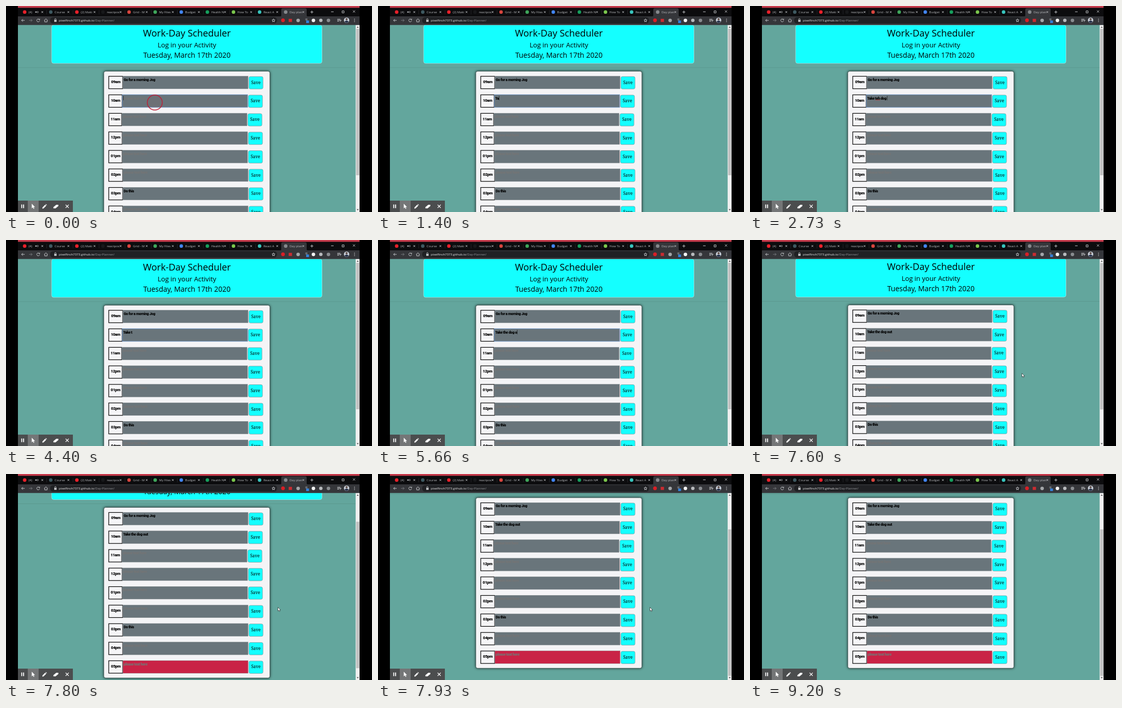
Animation, 706 px wide and 398 px high, one loop 9.26 s. Source, as an HTML page:

```html
<!DOCTYPE html>
<html lang="en">
<head>
<meta charset="utf-8">
<title>Work-Day Scheduler</title>
<style>
  html, body { margin: 0; width: 100%; height: 100%; overflow: hidden; background: #000; }
  svg { display: block; width: 706px; height: 398px; }
  text { white-space: pre; font-family: "Open Sans", "Noto Sans", sans-serif; }
  .mid { text-anchor: middle; }
  .tab { font-size: 6px; fill: #b9bbbe; }
  .heavy { font: 900 7.2px Roboto, sans-serif; letter-spacing: -.4px; }
  .hour { font-size: 7.7px; }
  .hint { fill: #757575; }
  .save { font: 8.2px "Noto Serif", serif; }
  .line { fill: none; stroke: #c4c6c9; stroke-width: 1; }
</style>
</head>
<body>
<svg viewBox="0 0 706 398">
  <defs>
    <clipPath id="viewport"><rect x="23" y="36.5" width="652" height="362"/></clipPath>
  </defs>
  <rect x="23" width="659" height="398" fill="#63a69d"/>
  <g clip-path="url(#viewport)"><g id="page"></g></g>
  <g id="scrollbar">
    <rect x="674.5" y="36.5" width="7.5" height="362" fill="#f1f1f1"/>
    <rect id="thumb" x="675.5" y="44" width="6" height="283" fill="#c1c1c1"/>
    <path d="M676.5 42l2-2.4 2 2.4zM676.5 392.5l2 2.4 2-2.4z" fill="#505050"/>
  </g>
  <g id="chrome"></g>
  <g id="recorder">
    <rect x="23" y="376" width="106" height="22" fill="#4b4d4e"/>
    <rect x="42" y="376" width="21" height="22" fill="#747677"/>
    <g fill="#fff">
      <path d="M29.5 383.5h1.8v7h-1.8zM33 383.5h1.8v7H33z"/>
      <path d="M49.7 382v9l2.1-1.9 1.4 3 1.4-.7-1.4-2.9h2.8z"/>
      <path d="M70 391.5l.5-2.5 5-5 2 2-5 5zM76.2 383.3l.8-.8 2 2-.8.8z"/>
      <path d="M91.5 388.5l5.5-4.5h4v2.5l-5.5 4.5h-4z"/>
    </g>
    <path d="M115 384l6 6m0-6l-6 6" stroke="#fff" stroke-width="1.1"/>
  </g>
  <circle id="ring" cx="287" cy="186.5" r="14.5" fill="#c0203a" fill-opacity=".06" stroke="#bd2038" stroke-width="1.5"/>
  <path id="pointer" d="M0 0v7.2l1.7-1.5 1.1 2.5 1.3-.6-1.1-2.4h2.2z" fill="#fff" stroke="#111" stroke-width=".6"/>
</svg>
<script>
const $ = id => document.getElementById(id);
const LOOP = 9260, SCROLL = 80.2, ROW_PITCH = 35.8, FIELD_WIDTH = 241.5;

const rect = (x, y, w, h, fill, more = "") =>
  `<rect x="${x}" y="${y}" width="${w}" height="${h}" fill="${fill}" ${more}/>`;
const dot = (x, y, r, fill) => `<circle cx="${x}" cy="${y}" r="${r}" fill="${fill}"/>`;
const text = (x, y, str, cls, more = "") => `<text x="${x}" y="${y}" class="${cls}" ${more}>${str}</text>`;
const line = (d, more = "") => `<path d="${d}" class="line" ${more}/>`;

// Planner page
const rows = [
  ["09am", 27.5, "Go for a morning Jog"], ["10am", 26.5], ["11am", 25.5],
  ["12pm", 26.5], ["01pm", 26.5], ["02pm", 27.5],
  ["03pm", 27.5, "Do this"], ["04pm", 27.5], ["05pm", 27.5]
];

function plannerRow([hour, width, note], i) {
  const y = 135.5 + i * ROW_PITCH, field = 198 + width, button = field + FIELD_WIDTH + 1.5;
  const editable = hour === "10am";
  const content = note
    ? text(field + 1.5, y + 9.2, note, "heavy")
    : text(field + 1.5, y + 9.2, "please text here", "heavy hint", editable ? 'id="hint"' : "");
  return rect(198.2, y + .3, width - .6, 24, "#f5f5f7", 'stroke="#000" stroke-width="1.2"') +
    text(198 + width / 2, y + 13.4, hour, "heavy hour mid") +
    rect(field, y, FIELD_WIDTH, 24.5, i === 8 ? "#c92346" : "#69757b", 'stroke="#8b9396" stroke-width=".5"') +
    content +
    (editable ? editor(field, y) : "") +
    rect(button, y + .8, 27.3, 24, "#14ffff", 'rx="3" stroke="#7e9c9f" stroke-width=".8"') +
    text(button + 13.5, y + 15, "Save", "save mid");
}

function editor(x, y) {
  return rect(x, y, FIELD_WIDTH, 24.5, "none", 'id="focus" stroke="#6590c4" stroke-width=".9"') +
    text(x + 1.5, y + 9.2, "", "heavy", 'id="entry"') +
    `<path id="squiggle" d="M242 ${y + 10.6}l1 -.8l1 .8l1 -.8l1 .8l1 -.8l1 .8l1 -.8l1 .8l1 -.8" fill="none" stroke="#d22" stroke-width=".6"/>` +
    rect(x + 1.6, y + 2.4, .6, 8.4, "#000", 'id="caret"');
}

$("page").innerHTML =
  rect(88, 36.8, 521.5, 74, "#14ffff", 'rx="4" stroke="#a5e3e0" stroke-width=".8"') +
  text(349, 59, "Work-Day Scheduler", "mid", 'font-size="17.9"') +
  text(349, 79.5, "Log in your Activity", "mid", 'font-size="12.9"') +
  text(349, 100, "Tuesday, March 17th 2020", "mid", 'font-size="13.87"') +
  rect(23, 118.6, 652, .7, "#589389") +
  rect(188.7, 126, 320.3, 329.5, "#f4f4f6",
    'rx="3.5" stroke="#2b4643" stroke-width=".8" style="filter:drop-shadow(0 0 2.5px #000b)"') +
  rows.map(plannerRow).join("");

// Browser frame
const tabs = [
  ["(4)", "#e8202a"], ["Course", "#3e5961"], ["(2) Maki", "#e8202a"], ["reactpos", "#17181a"],
  ["Grid - M", "#d8453e"], ["My Files", "#3fa75b"], ["Budget", "#4285f4"], ["Health N", "#16a05d"],
  ["How To", "#7bc74d"], ["React A", "#38c5bd"], ["Day plan", "#85888c"]
];
const cross = (x, y, r) => line(`M${x - r} ${y - r}l${2 * r} ${2 * r}m0 ${-2 * r}l${-2 * r} ${2 * r}`);

function browserTab([title, color], i) {
  const x = 36 + i * 50.35;
  const active = i === tabs.length - 1;
  return (active ? "" : rect(x + 42.5, 8, .5, 8, "#3a3b3e")) +
    dot(x, 11.7, 3.4, color) +
    text(x + 7.5, 13.8, title, "tab") +
    cross(x + 34, 11.7, 1.6);
}

$("chrome").innerHTML =
  rect(23, 0, 659, 21, "#0c0c0e") +
  rect(23, 0, 659, 3.5, "#c53a4b") +
  rect(23, 20, 659, 16.7, "#35363a") +
  `<path d="M528 20.5q3 0 3-3v-10q0-3 3-3h43q3 0 3 3v10q0 3 3 3z" fill="#35363a"/>` +
  tabs.map(browserTab).join("") +
  line("M59 10.3v2.8M61.2 9.8q1.4 1.9 0 3.8", 'stroke-width=".8"') +
  rect(56.5, 10.6, 2, 2.2, "#c4c6c9") +
  line("M587.2 11.7h5.6M590 8.9v5.6M627 11.2h5M648.3 9.5h3.8v3.8h-3.8z") + cross(671.3, 10.6, 2) +
  line("M36 27.8h-6m2.5-2.5l-2.5 2.5 2.5 2.5") +
  line("M44.5 27.8h6m-2.5-2.5l2.5 2.5-2.5 2.5", 'style="stroke:#777a7e"') +
  line("M64.3 26a2.8 2.8 0 1 0 .6 2.4M65 24.6v2h-2") +
  line("M73.5 28l3.5-3.3 3.5 3.3M74.7 27.3v3.5h4.6v-3.5") +
  rect(85, 21.5, 438, 12.6, "#202124", 'rx="6.3"') +
  rect(93, 27, 4.6, 3.6, "#c4c6c9") + line("M94 27v-1.4a1.3 1.3 0 0 1 2.6 0V27", 'stroke-width=".7"') +
  text(102, 30, '<tspan fill="#eee">pixelfinch7373.github.io</tspan><tspan fill="#94979b">/Day-Planner/</tspan>', "", 'font-size="6.1"') +
  line("M516 24.8l.9 2 2.1.2-1.6 1.5.5 2.1-1.9-1.1-1.9 1.1.5-2.1-1.6-1.5 2.1-.2z", 'stroke-width=".7"') +
  dot(534.3, 27.6, 3.6, "#d81f26") +
  rect(545.3, 24.8, 6.4, 6, "#c92c31") +
  dot(563.5, 27.8, 3.4, "#a3a6a9") +
  rect(577.5, 24, 4, 4, "#666a70") + rect(579, 28, 5.5, 5, "#347fd6") +
  dot(593, 27.8, 3.4, "#f2f2f2") +
  dot(607.3, 27.8, 3.3, "#b8babd") +
  dot(622, 27.8, 3.4, "#898c90") +
  line("M639 25.5h6m-6 2h6m-6 2h3.5m2.5 1v-3h2") +
  dot(657, 27.5, 5.2, "#c5cbd5") + dot(657, 25.4, 2, "#5a4842") +
  `<path d="M652.8 30.6q4.2-5 8.4 0-4.2 4.2-8.4 0z" fill="#28324a"/>` +
  [25.2, 27.7, 30.2].map(y => dot(672.3, y, .8, "#c4c6c9")).join("");

// Timeline
const typed = [1130, 1400, 1460, 1600, 1660, 1800, 1930, 2060, 2200, 2260, 2460, 2530, 2730];
const erased = [3860, 3930, 4000, 4060, 4130, 4330];
const retyped = [4800, 4860, 5000, 5200, 5260, 5400, 5460, 5660, 5730, 5800];
const REWRITE = 4400, BLUR = 7390, BLINK = 530;
const pointerPath = [
  [6730, 300, 188], [6930, 513.5, 179.5], [7530, 524.5, 257.5], [7990, 524.5, 257.5], [8530, 500, 402]
];

const count = (times, t) => times.filter(time => time <= t).length;
const smooth = (t, from, to) => {
  const p = Math.min(1, Math.max(0, (t - from) / (to - from)));
  return p * p * (3 - 2 * p);
};
const show = (id, visible) => $(id).setAttribute("visibility", visible ? "visible" : "hidden");

function entryAt(t) {
  return t < REWRITE
    ? "Take teh dog ".slice(0, count(typed, t) - count(erased, t))
    : "Take the dog out".slice(0, 6 + count(retyped, t));
}

function drawEntry(t) {
  const entry = $("entry"), value = entryAt(t);
  if (entry.textContent !== value) entry.textContent = value;
  show("hint", !value);
  show("squiggle", t >= 2600 && t < 4000);
  show("focus", t < BLUR);
  const lastKey = [-70, ...typed, ...retyped].filter(time => time <= t).pop();
  show("caret", t < BLUR && (t - lastKey) % (2 * BLINK) < BLINK);
  $("caret").setAttribute("x", 226.1 + (value ? entry.getComputedTextLength() : 0));
}

function drawPointer(t) {
  const next = pointerPath.findIndex(([time]) => time > t);
  show("pointer", next > 0);
  if (next < 1) return;
  const [t0, x0, y0] = pointerPath[next - 1], [t1, x1, y1] = pointerPath[next];
  const p = smooth(t, t0, t1);
  $("pointer").setAttribute("transform", `translate(${x0 + (x1 - x0) * p} ${y0 + (y1 - y0) * p})`);
}

const start = performance.now();
function draw() {
  const t = (performance.now() - start) % LOOP;
  const scroll = smooth(t, 7585, 7900);
  $("page").setAttribute("transform", `translate(0 ${-SCROLL * scroll})`);
  $("thumb").setAttribute("y", 44 + 63 * scroll);
  $("ring").setAttribute("opacity", 1 - smooth(t, 30, 460));
  drawEntry(t);
  drawPointer(t);
  requestAnimationFrame(draw);
}
draw();
</script>
</body>
</html>
```
